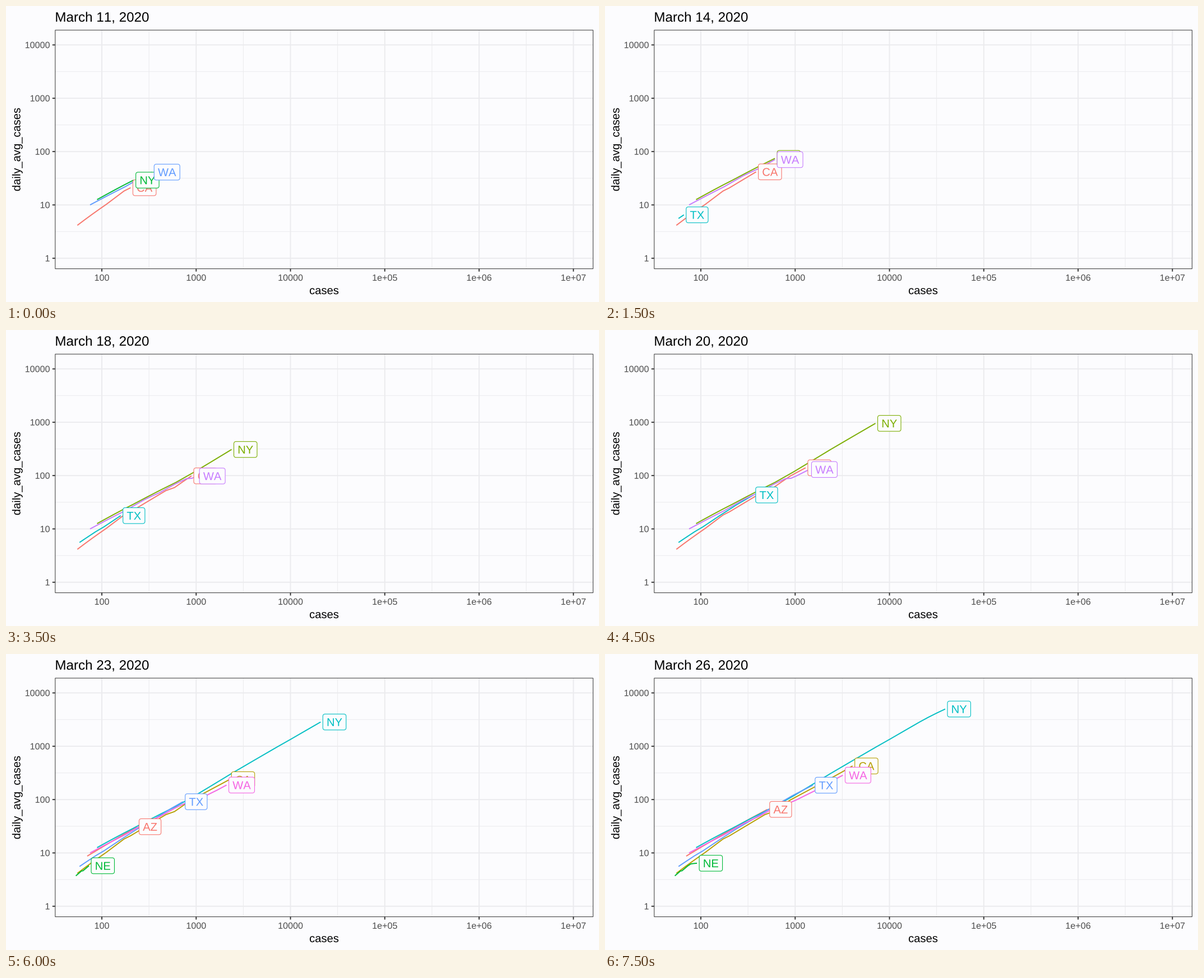
Recreate the animation shown at these times as a matplotlib script. Size 1058 px wide and 529 px high, loop 8 s.

```python
import matplotlib.pyplot as plt
import numpy as np
from matplotlib.animation import FuncAnimation
from matplotlib.patches import FancyBboxPatch, PathPatch, Rectangle
from matplotlib.path import Path
from matplotlib.textpath import TextPath
from matplotlib.transforms import Affine2D

W, H, DPI = 1058, 529, 72  # at 72 dpi one point is one pixel
LEFT, TOP, RIGHT, BOTTOM = 87.8, 43.1, 1047.4, 469.6
BACK, GRID, DARK, TICK_TEXT = "#FCFCFE", "#EBEBEE", "#333333", "#4D4D4D"
TITLE, NORMAL, SMALL = 24.2, 20.2, 16.13
FIRST_DAY, LAST_DAY = 11, 26

# Key points (day of March, total cases); growth is exponential in between.
# The first key lies one week before the curve becomes visible.
GROWTH = {
    "AZ": [(13, 9), (16, 18), (20, 70), (23, 235), (24, 326), (26, 508)],
    "CA": [(-3, 26), (4, 55), (8, 112), (9, 172), (11, 202), (15, 478),
           (18, 893), (23, 2240), (26, 4060)],
    "NE": [(13, 27), (17, 35), (20, 53), (21, 61), (22, 63), (23, 73), (26, 91)],
    "NY": [(0, 1), (7, 89), (11, 217), (14, 610), (16, 950), (17, 1374),
           (20, 7102), (23, 20875), (26, 38987)],
    "TX": [(6, 19), (9, 24), (12, 41), (13, 58), (16, 86), (17, 105),
           (21, 545), (23, 724), (26, 1540)],
    "WA": [(-2, 5), (5, 75), (9, 178), (10, 279), (14, 610), (18, 1026),
           (21, 1655), (23, 2101), (26, 3207)],
}
PALETTES = {
    3: ["#F8766D", "#00BA38", "#619CFF"],
    4: ["#F8766D", "#7CAE00", "#00BFC4", "#C77CFF"],
    6: ["#F8766D", "#B79F00", "#00BA38", "#00BFC4", "#619CFF", "#F564E3"],
}

plt.rcParams["font.family"] = "Liberation Sans"

fig = plt.figure(figsize=(W / DPI, H / DPI), dpi=DPI, facecolor=BACK)
ax = fig.add_axes([0, 0, 1, 1])
ax.set_xlim(0, W)
ax.set_ylim(H, 0)
ax.axis("off")


def x_at(log_cases):
    return 171 + 168.27 * (log_cases - 2)


def y_at(log_avg):
    return 450.8 - 95.32 * log_avg


def ink_width(text, size):
    return TextPath((0, 0), text, size=size).get_extents().width


def advance(text, size):
    """Width without kerning, side bearings included."""
    bars = ink_width("||", size)
    return sum(ink_width(f"|{ch}|", size) - bars for ch in text)


def write(x, y, text, size, color="black", align=0.5, angle=0, z=5):
    """Set text on a baseline; align is the share of its width before x."""
    pen, glyphs = 0, []
    for ch in text:
        if ch != " ":
            glyphs.append(TextPath((pen, 0), ch, size=size))
        pen += advance(ch, size)
    place = Affine2D().translate(-align * pen, 0).scale(1, -1)
    place.rotate_deg(-angle).translate(x, y)
    shape = place.transform_path(Path.make_compound_path(*glyphs))
    return ax.add_patch(PathPatch(shape, fc=color, lw=0, zorder=z, snap=False))


def stroke(xs, ys, color, width, z):
    return ax.plot(xs, ys, color=color, lw=width, zorder=z, snap=False,
                   solid_capstyle="butt", solid_joinstyle="round")[0]


def draw_axes():
    for k in range(2, 7):
        stroke([x_at(k + 0.5)] * 2, [TOP, BOTTOM], GRID, 1, 1)
    for k in range(4):
        stroke([LEFT, RIGHT], [y_at(k + 0.5)] * 2, GRID, 1, 1)
    for k in range(2, 8):
        x = x_at(k)
        stroke([x, x], [TOP, BOTTOM], GRID, 1.9, 1.5)
        stroke([x, x], [BOTTOM, BOTTOM + 5], DARK, 1.9, 2)
        write(x, 491, f"{10 ** k}" if k < 5 else f"1e+{k:02}", SMALL, TICK_TEXT)
    for k in range(5):
        y = y_at(k)
        stroke([LEFT, RIGHT], [y, y], GRID, 1.9, 1.5)
        stroke([LEFT - 5, LEFT], [y, y], DARK, 1.9, 2)
        write(78.5, y + 5.7, f"{10 ** k}", SMALL, TICK_TEXT, align=1)
    ax.add_patch(Rectangle((LEFT, TOP), RIGHT - LEFT, BOTTOM - TOP, fill=False,
                           ec=DARK, lw=1, zorder=4, snap=False))
    write(567.5, 515, "cases", NORMAL)
    write(25.5, 256.5, "daily_avg_cases", NORMAL, angle=90)


def curve(keys, day):
    """Stage points of weekly average against total cases, one per day."""
    days, totals = np.array(keys).T
    shown = np.arange(days[0] + 7, day + 1)

    def total(d):
        return 10 ** np.interp(d, days, np.log10(totals))

    avg = (total(shown) - total(shown - 7)) / 7
    return x_at(np.log10(total(shown))), y_at(np.log10(avg))


def draw_label(name, x, y, color, z):
    pad, h = 6.7, 28.4
    x += 4
    box = FancyBboxPatch((x, y - h / 2), advance(name, NORMAL) + 2 * pad, h,
                         boxstyle="round,pad=0,rounding_size=4", fc=BACK,
                         ec=color, lw=1.1, zorder=z, snap=False)
    text = write(x + pad, y + 7.2, name, NORMAL, color, align=0, z=z + 0.5)
    return [ax.add_patch(box), text]


draw_axes()
moving = []


def update(i):
    while moving:
        moving.pop().remove()
    day = FIRST_DAY + i
    moving.append(write(87.3, 28, f"March {day}, 2020", TITLE, align=0))
    curves = {name: curve(keys, day) for name, keys in GROWTH.items()}
    curves = {name: c for name, c in curves.items() if len(c[0]) > 1}
    colors = PALETTES[len(curves)]
    for k, ((name, (xs, ys)), color) in enumerate(zip(curves.items(), colors)):
        moving.append(stroke(xs, ys, color, 1.95, 3 + k / 10))
        moving.extend(draw_label(name, xs[-1], ys[-1], color, 10 + k))
    return moving


anim = FuncAnimation(fig, update, frames=LAST_DAY - FIRST_DAY + 1, interval=500,
                     init_func=lambda: update(0), repeat=True, repeat_delay=0,
                     blit=False)
plt.show()
```
